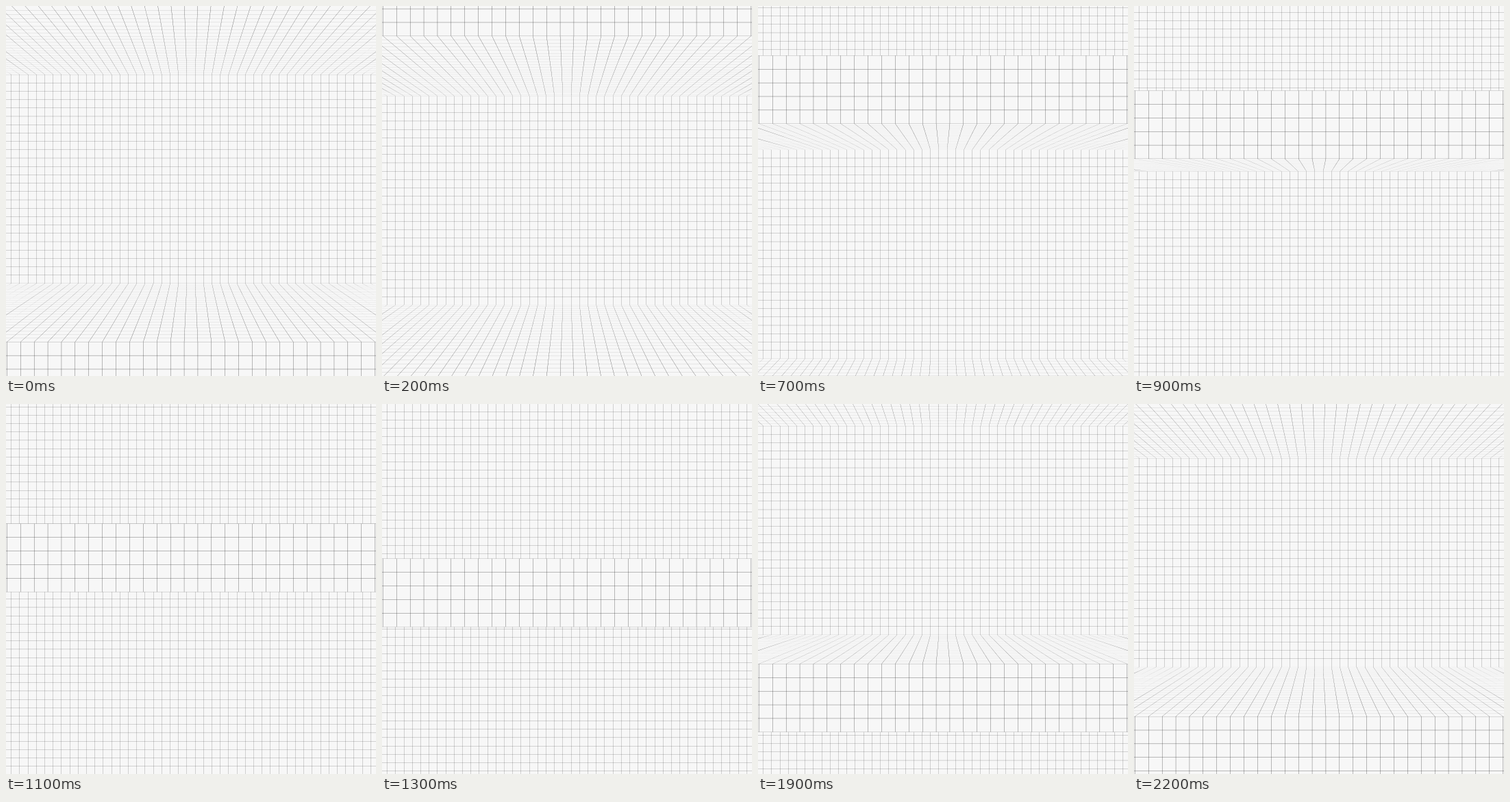
An HTML page with a canvas that plays this animation: 540x540 px, repeating every 2300 ms.

```html
<!DOCTYPE html>
<html lang="en">
<head>
<meta charset="utf-8">
<title>Grid steps</title>
<style>
  html, body { margin: 0; height: 100%; overflow: hidden; background: #f7f7f7; }
  canvas { display: block; }
</style>
</head>
<body>
<canvas id="stage" width="540" height="540"></canvas>
<script>
const ctx = document.getElementById('stage').getContext('2d');
const SIZE = 540, CENTER = 270;
const PAPER = '#f7f7f7', INK = '#303030';
const NEAR = 19.9, FAR = 12.2;              // pixels per cell on the front and back planes
const FRONT = 5, BACK = 25, DEPTH = 25;     // cells
const PERIOD = FRONT + BACK;
const LINE = 0.016;                         // line width in cells
const COLUMNS = 23;
const LOOP = 2300, STEP = 100;
const START = -106.8, SPEED = 0.25586;      // pixels, pixels per ms on the front plane

const project = (cells, scale) => CENTER + cells * scale;
const scaleAt = depth => 1 / (1 / NEAR + (1 / FAR - 1 / NEAR) * depth / DEPTH);

function bar(y1, y2, color) {
  ctx.fillStyle = color;
  ctx.fillRect(0, Math.min(y1, y2), SIZE, Math.abs(y2 - y1));
}

// One line running from y1 to y2, narrowing with the scale
function column(x, y1, scale1, y2, scale2) {
  const l = x - LINE / 2, r = x + LINE / 2;
  ctx.beginPath();
  ctx.moveTo(project(l, scale1), y1);
  ctx.lineTo(project(r, scale1), y1);
  ctx.lineTo(project(r, scale2), y2);
  ctx.lineTo(project(l, scale2), y2);
  ctx.fill();
}

function columns(y1, scale1, y2, scale2) {
  ctx.fillStyle = INK;
  for (let k = -COLUMNS; k < COLUMNS; k++) column(k + 0.5, y1, scale1, y2, scale2);
}

function wall(top, rows, scale) {
  const y1 = project(top, scale), y2 = project(top + rows, scale);
  bar(y1, y2, PAPER);
  columns(y1, scale, y2, scale);
  for (let j = 0; j <= rows; j++) {
    const from = Math.max(0, j - LINE / 2), to = Math.min(rows, j + LINE / 2);
    bar(project(top + from, scale), project(top + to, scale), INK);
  }
}

function slab(level) {
  const y1 = project(level, NEAR), y2 = project(level, FAR);
  bar(y1, y2, PAPER);
  columns(y1, NEAR, y2, FAR);
  for (let d = 0; d < DEPTH; d++) {
    bar(project(level, scaleAt(d)), project(level, scaleAt(d + LINE)), INK);
  }
}

function draw(time) {
  const top = (START + SPEED * time - CENTER) / NEAR;
  const ledges = [-1, 0, 1].map(n => top + n * PERIOD);
  bar(0, SIZE, PAPER);
  for (const y of ledges) wall(y - BACK, BACK, FAR);
  for (const y of ledges) {
    if (y > 0) slab(y);
    if (y + FRONT < 0) slab(y + FRONT);
  }
  for (const y of ledges) wall(y, FRONT, NEAR);
}

function tick() {
  const time = performance.now() % LOOP;
  draw(Math.floor(time / STEP) * STEP);
  requestAnimationFrame(tick);
}
tick();
</script>
</body>
</html>
```
